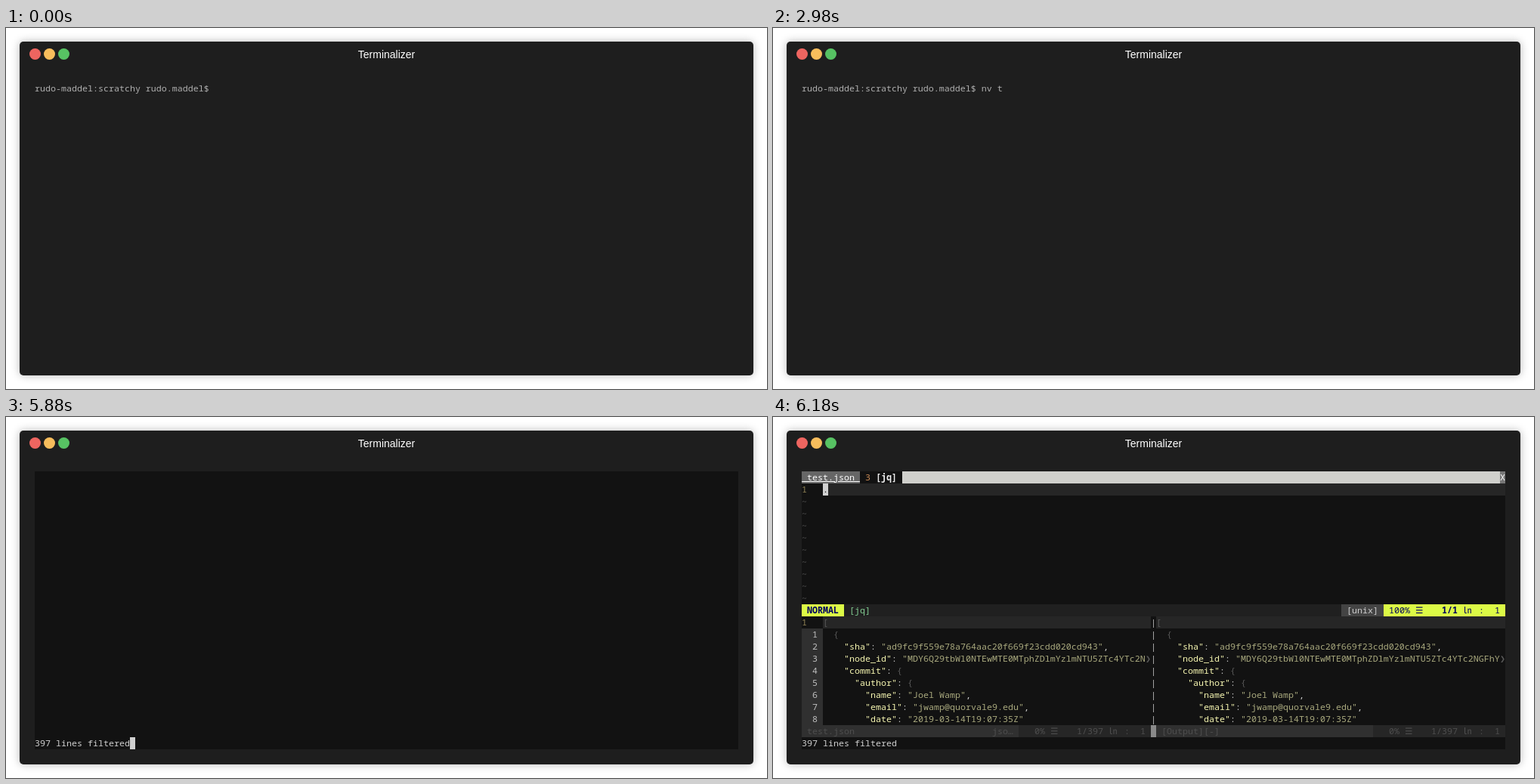
An HTML page that plays this animation: 1007 px wide and 478 px high, repeating every 8 s.

```html
<!DOCTYPE html>
<html lang="en">
<head>
<meta charset="utf-8">
<title>Terminal</title>
<style>
  html, body { margin: 0; width: 100%; height: 100%; overflow: hidden; background: #fff; }
  #window {
    position: absolute; left: 18px; top: 18px; width: 971px; height: 442px;
    border-radius: 5px; background: #1e1e1e; box-shadow: 0 0 12px rgba(0, 0, 0, .28);
  }
  #title {
    position: absolute; top: 9px; width: 100%; text-align: center; color: #fff;
    font: 14px/16px "Liberation Sans", Arial, sans-serif;
  }
  .button { position: absolute; top: 9px; width: 15px; height: 15px; border-radius: 50%; }
  #screen {
    position: absolute; left: 20px; top: 54px; width: 931px; height: 368px; overflow: hidden;
    font: 11.667px/16px "Noto Sans Mono", "DejaVu Sans Mono", monospace;
    font-variant-ligatures: none;
  }
  #screen span { position: absolute; height: 16px; white-space: pre; }
</style>
</head>
<body>
<div id="window">
  <div class="button" style="left:13px;background:#ee6560"></div>
  <div class="button" style="left:32px;background:#f7bd5c"></div>
  <div class="button" style="left:51px;background:#57c263"></div>
  <div id="title">Terminalizer</div>
  <div id="screen"></div>
</div>
<script>
const LOOP = 8000, CELL_W = 7, CELL_H = 16, COLS = 133;
const screen = document.getElementById('screen');

const C = {
  shell: '#afafaf', editor: '#121212', text: '#d0d0d0', dim: '#4e4e4e', lineNr: '#8f8255',
  cursorLine: '#262626', gutter: '#303030', lime: '#dcfa46', navy: '#00005f',
  key: '#f7f7b2', string: '#a9a97e', bar: '#202020', inactive: '#303030', fill: '#d0d0cc',
};

const PROMPT = 'rudo-maddel:scratchy rudo.maddel$ ';
const COMMAND = "nv test.json -c 'call ScratchySetup()'";
const JSON_LINES = [
  '[',
  '  {',
  '    "sha": "ad9fc9f559e78a764aac20f669f23cdd020cd943",',
  '    "node_id": "MDY6Q29tbWl0NTEwMTE0MTphZDlmYzlmNTU5ZTc4YTc2NGFhYzIw',
  '    "commit": {',
  '      "author": {',
  '        "name": "Joel Wamp",',
  '        "email": "jwamp@quorvale9.edu",',
  '        "date": "2019-03-14T19:07:35Z"',
];

// Places text on the character grid.
function put(row, col, text, color = C.text, style = {}) {
  const span = document.createElement('span');
  span.textContent = text;
  Object.assign(span.style, { left: col * CELL_W + 'px', top: row * CELL_H + 'px', color }, style);
  screen.append(span);
}

// Fills a run of cells with one colour.
function fill(row, col, count, background, rows = 1) {
  put(row, col, '', '', {
    width: count * CELL_W + 'px', height: rows * CELL_H + 'px', background,
  });
}

function shell(typed) {
  put(0, 0, PROMPT + COMMAND.slice(0, typed), C.shell);
}

function blankEditor(message, showCursor) {
  fill(0, 0, COLS, C.editor, 23);
  put(22, 0, message);
  if (showCursor) fill(22, message.length, 1, C.text);
}

function position(row, col, percent, lineCol, line, color, weight) {
  put(row, col, percent, color);
  put(row, col + percent.length + 1, '☰', color);
  put(row, lineCol, line, color, { fontWeight: weight });
  put(row, lineCol + line.length + 1, '㏑', color);
  put(row, lineCol + line.length + 4, ':', color);
  put(row, lineCol + line.length + 7, '1', color);
}

function queryPane(active) {
  fill(0, 0, 11, '#666');
  put(0, 0, ' test.json ', '#fff', { textDecoration: 'underline' });
  put(0, 12, '3', '#c98a55');
  put(0, 14, '[jq]', '#eee', { fontWeight: 'bold' });
  fill(0, 19, 114, C.fill);
  if (active) fill(0, 132, 1, '#777');
  put(0, 132, 'X', active ? '#fff' : '#111');

  put(1, 0, '1', C.lineNr);
  fill(1, 4, 129, C.cursorLine);
  if (active) fill(1, 4, 1, C.text);
  put(1, 4, '.', active ? '#111' : C.text);
  for (let row = 2; row <= 10; row++) put(row, 0, '~', C.dim);

  fill(11, 0, COLS, C.bar);
  fill(11, 0, 8, C.lime);
  put(11, 1, 'NORMAL', C.navy, { fontWeight: 'bold' });
  put(11, 9, '[jq]', '#82cc92');
  fill(11, 102, 8, '#444');
  put(11, 103, '[unix]');
  fill(11, 110, 23, C.lime);
  position(11, 111, '100%', 121, '1/1', C.navy, 'bold');
}

function jsonPane(col, width) {
  fill(12, col, width, C.cursorLine);
  JSON_LINES.forEach((line, i) => {
    const visible = line.slice(0, width - 1);
    for (const { 0: token, index } of visible.matchAll(/"[^"]*"?|[[{:,]/g)) {
      const isKey = visible[index + token.length] === ':';
      const color = token[0] === '"' ? (isKey ? C.key : C.string)
        : '[{'.includes(token) ? '#585858' : C.text;
      put(12 + i, col + index, token, color);
    }
    if (line.length >= width) put(12 + i, col + width - 1, '❯', '#5a5a5a');
  });
}

function inputPane() {
  put(12, 0, '1', C.lineNr);
  fill(13, 0, 4, C.gutter, 8);
  for (let n = 1; n <= 8; n++) put(12 + n, 2, String(n), '#c0c0c0');
  jsonPane(4, 62);
  for (let row = 12; row <= 20; row++) put(row, 66, '|', '#bcbcbc');
}

function inactiveBar(col, name) {
  fill(21, col, 66, C.cursorLine);
  fill(21, col, 41, C.inactive);
  put(21, col + 1, name, C.dim);
  position(21, col + 44, '0%', col + 52, '1/397', C.dim, 'normal');
}

function editor(stage) {
  blankEditor('397 lines filtered', stage === 0);
  if (stage >= 1) queryPane(stage === 4);
  if (stage >= 2) inputPane();
  if (stage >= 3) jsonPane(67, 66);
  if (stage === 4) {
    inactiveBar(0, 'test.json');
    put(21, 36, 'jso…', C.dim);
    fill(21, 66, 1, '#8a8a8a');
    inactiveBar(67, '[Output][-]');
  }
}

const STEPS = [
  [0, () => shell(0)],
  [500, () => shell(1)],
  [830, () => shell(2)],
  [2980, () => shell(4)],
  [3050, () => shell(5)],
  [3230, () => shell(6)],
  [3590, () => shell(COMMAND.length)],
  [5640, () => blankEditor('"test.json" 397L, 19631C', true)],
  [5850, () => editor(0)],
  [5915, () => editor(1)],
  [5980, () => editor(2)],
  [6080, () => editor(3)],
  [6180, () => editor(4)],
];

let shown = null;
function frame() {
  const time = performance.now() % LOOP;
  const step = STEPS.findLast(([start]) => start <= time);
  if (step !== shown) {
    screen.replaceChildren();
    step[1]();
    shown = step;
  }
  requestAnimationFrame(frame);
}
frame();
</script>
</body>
</html>
```
